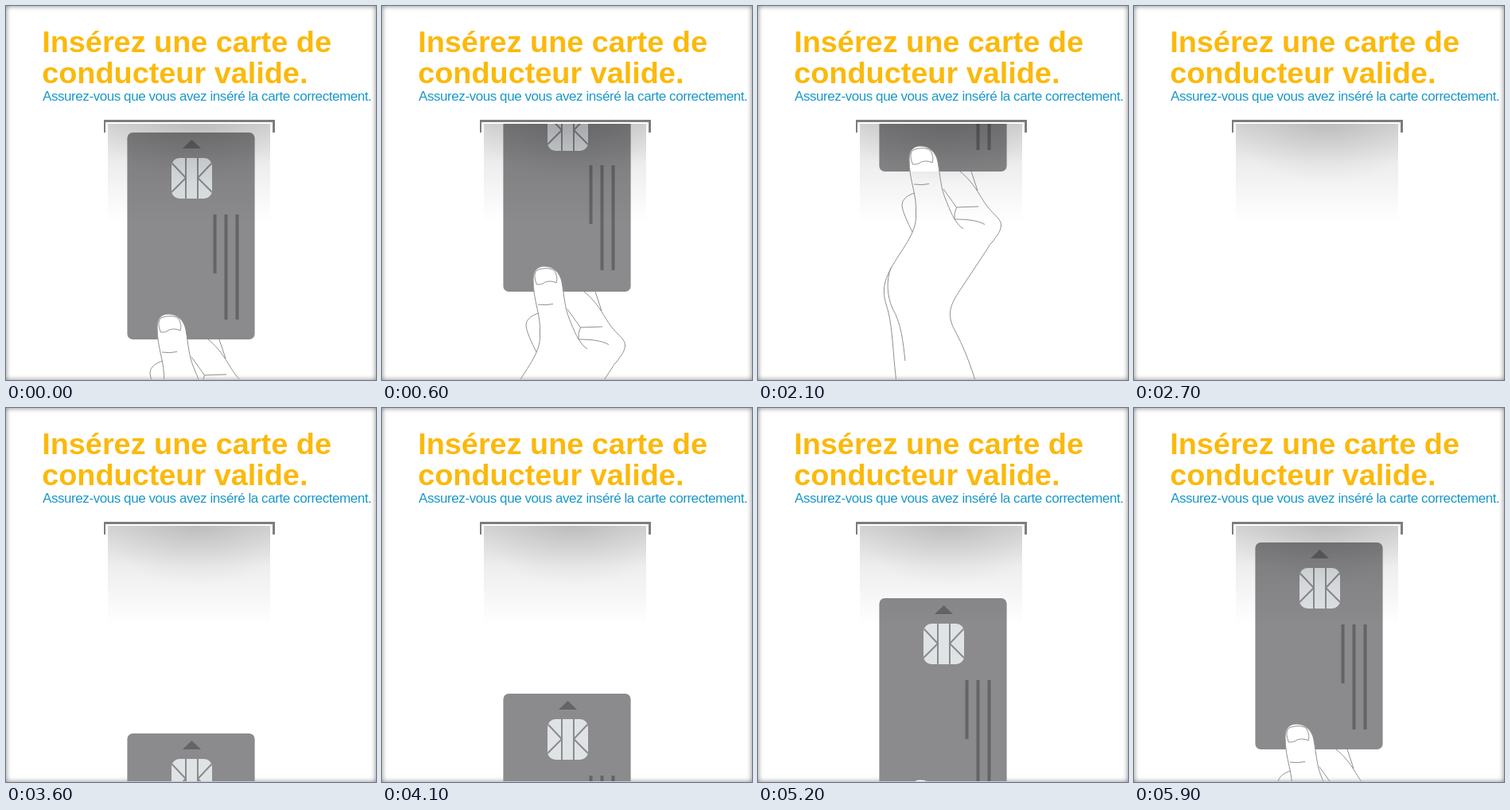
Animation, 465 px wide and 470 px high, one loop 6 s. Source, as an HTML page:

```html
<!DOCTYPE html>
<html lang="fr">
<head>
<meta charset="utf-8">
<title>Insertion de carte</title>
<style>
  html, body { margin: 0; width: 100%; height: 100%; overflow: hidden; background: #fff; }
  svg { position: absolute; left: 0; top: 0; display: block; }
  .edge {
    position: absolute; inset: 0;
    box-shadow: inset 0 0 6px rgba(0, 0, 0, .5);
  }
  text { font-family: "Liberation Sans", Arial, sans-serif; }
  .title { font-size: 37.85px; font-weight: bold; fill: #fbb90c; }
  .note { font-size: 17px; letter-spacing: -.43px; fill: #1a98c6; }
  .dark { fill: #646466; }
  .line { fill: none; stroke: #8e8e8e; stroke-width: 1; stroke-linejoin: round; }
  .skin { fill: #fff; }

  /* The small negative delay keeps each step clear of its boundary. */
  .move { animation: slide 6s -10ms infinite; }
  .stripes { animation: nudge 6s -10ms step-end infinite; }

  @keyframes slide {
    0%       { transform: translateY(0); animation-timing-function: steps(13); }
    21.6667% { transform: translateY(-130px); animation-timing-function: steps(7); }
    33.3333% { transform: translateY(-200px); animation-timing-function: step-end; }
    35%      { transform: translateY(-211px); animation-timing-function: steps(5); }
    43.3333% { transform: translateY(-261px); animation-timing-function: step-end; }
    45%      { transform: translateY(400px); animation-timing-function: step-end; }
    53.3333% { transform: translateY(290px); animation-timing-function: steps(16); }
    80%      { transform: translateY(130px); animation-timing-function: step-end; }
    81.6667% { transform: translateY(110px); animation-timing-function: steps(11); }
    100%     { transform: translateY(0); }
  }
  @keyframes nudge {
    0%, 45%, 100% { transform: translateY(0); }
    1.6667%       { transform: translateY(-2px); }
  }
</style>
</head>
<body>
<div class="edge"></div>
<svg width="465" height="470" viewBox="0 0 465 470">
  <defs>
    <clipPath id="slot"><rect x="0" y="148" width="465" height="321"/></clipPath>
    <clipPath id="reach"><rect x="0" y="143" width="465" height="326"/></clipPath>
    <clipPath id="chip"><rect x="208" y="191" width="51" height="51" rx="10"/></clipPath>
    <linearGradient id="fade" x1="0" y1="0" x2="0" y2="1">
      <stop offset="0" stop-opacity=".17"/>
      <stop offset=".4" stop-opacity=".07"/>
      <stop offset="1" stop-opacity="0"/>
    </linearGradient>
    <radialGradient id="glow" cx=".55" cy="0" r=".6">
      <stop offset="0" stop-opacity=".11"/>
      <stop offset="1" stop-opacity="0"/>
    </radialGradient>
  </defs>

  <text class="title" x="45.2" y="58">Insérez une carte de</text>
  <text class="title" x="45.2" y="97">conducteur valide.</text>
  <text class="note" x="46" y="119">Assurez-vous que vous avez inséré la carte correctement.</text>

  <g clip-path="url(#slot)">
    <g class="move">
      <rect x="152.4" y="159" width="160.2" height="260" rx="7" fill="#8b8b8d"/>
      <path class="dark" d="M222 179L233.5 168L245 179Z"/>
      <g clip-path="url(#chip)">
        <rect x="208" y="191" width="51" height="51" fill="#dfe3e6"/>
        <path d="M226 191V242M241 191V242M207 196L226 216L207 235M260 196L241 216L260 235"
              fill="none" stroke="#8b8b8d" stroke-width="2"/>
      </g>
      <g class="stripes dark">
        <rect x="260.5" y="262" width="4" height="74"/>
        <rect x="274.5" y="262" width="4" height="132"/>
        <rect x="288.5" y="262" width="4" height="132"/>
      </g>
    </g>
  </g>

  <!-- slot shadow and rim -->
  <rect x="128" y="148" width="204" height="124" fill="url(#fade)"/>
  <rect x="128" y="148" width="204" height="124" fill="url(#glow)"/>
  <path d="M123 143H338V159H335V146H125V159H123Z" fill="#7c7d7c"/>

  <!-- hand: only the part of the thumb on the card is filled -->
  <g clip-path="url(#reach)">
    <g class="move">
      <g transform="translate(0 211)">
        <path class="skin" d="M191 208C190 203 190 197 190 192C190 181 196 176 204 176
          C216 176 224 185 226 196L228 208Z"/>
        <path class="line" d="M254 208C263 215 269 223 274 230C281 241 285 248 289 253C297 263 306 268 305.500 276
          C305 284 299 290 295 296C292 299 291 300 289 304L252 360
          C240 378 238 390 247 407C257 425 266 448 272.500 469L288 530"/>
        <path class="line" d="M268 208L276 232M233 230L249.500 253Q263 252.500 277 252
          M249.500 253Q246 260 247 268C262 268 275 269 285 274.500"/>
        <path class="line" d="M197 235C190 237 181 242 181 250C181 257 188 272 194 284"/>
        <path class="line" d="M167 329C161 345 162 364 169 380C180 399 182 420 185 446"/>
        <path class="line" d="M258 280C247 273 241 256 235 241C230 229 229 214 226 196C224 185 216 176 204 176
          C196 176 190 181 190 192C190 222 200 235 198.500 262C200 286 179 307 167 330
          C158 346 156 359 161 375C169 398 169 430 173.500 469L179 530"/>
        <path class="line" d="M194.500 199C191 191 191 184 195 181C201 178 212 178 216 181C219 185 221 191 219 197
          C214 194 208 195 205 196C201 199 198 199 194.500 199Z"/>
        <path class="line" d="M196 224Q206 225.500 215 223.500"/>
      </g>
    </g>
  </g>
</svg>
</body>
</html>
```
